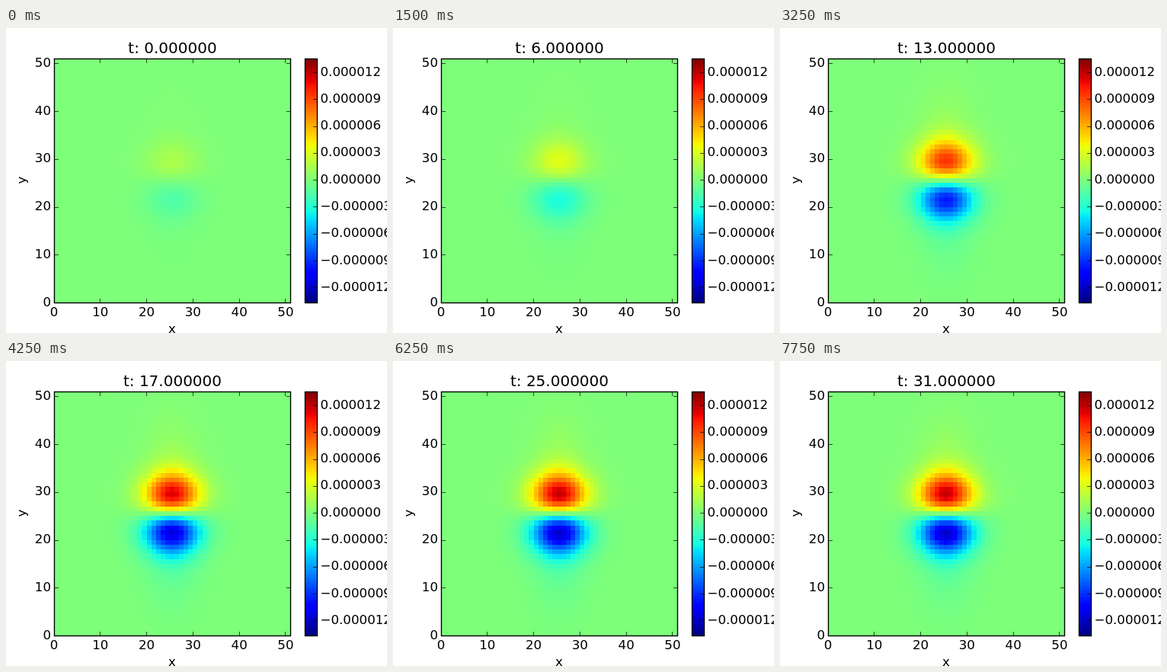
An HTML page with a canvas that plays this animation: 500 px wide and 400 px high, repeating every 8 s.

```html
<!DOCTYPE html>
<html lang="en">
<head>
<meta charset="utf-8">
<title>Field over time</title>
<style>
html, body { margin: 0; width: 100%; height: 100%; overflow: hidden; background: #fff; }
canvas { display: block; }
</style>
</head>
<body>
<canvas id="stage" width="500" height="400"></canvas>
<script>
const ctx = document.getElementById("stage").getContext("2d");
const CELLS = 51, LEFT = 63, TOP = 40, WIDTH = 310, HEIGHT = 320, BOTTOM = TOP + HEIGHT;
const MIN = -13.68, MAX = 13.55; // in units of 1e-6
const STEP_MS = 250, STEPS = 32;

const xAt = v => LEFT + v * WIDTH / CELLS;
const yAt = v => BOTTOM - v * HEIGHT / CELLS;
const barY = v => BOTTOM - (v - MIN) / (MAX - MIN) * HEIGHT;
const clamp = v => Math.min(1, Math.max(0, v));
const ramp = (v, from, to) => clamp((v - from) / (to - from));

// Jet colour map in 256 levels
function jet(level) {
  const v = Math.min(255, Math.floor(clamp(level) * 256)) / 255;
  const r = ramp(v, .35, .66) - .5 * ramp(v, .89, 1);
  const g = ramp(v, .125, .375) - ramp(v, .64, .91);
  const b = .5 + .5 * ramp(v, 0, .11) - ramp(v, .34, .65);
  return `rgb(${[r, g, b].map(c => Math.round(c * 255))})`;
}

const amplitude = t => 1.2 + 10 / (1 + Math.exp((9.7 - t) / 2.5));

// Two opposite lobes with a faint wide halo
function shape(dx, dy) {
  const lobe = dy / 4 * Math.exp(.5 - dy * dy / 32);
  const halo = .1 * dy / 9 * Math.exp(.5 - dy * dy / 162);
  const across = .95 * Math.exp(-dx * dx / 33) + .05 * Math.exp(-dx * dx / 90);
  return (lobe + halo) * across;
}

function text(str, x, y, align = "center", size = 16.67) {
  ctx.font = `${size}px "DejaVu Sans", sans-serif`;
  ctx.textAlign = align;
  ctx.fillText(str, x, Math.floor(y));
}

function tick(x, y, dx, dy) {
  ctx.beginPath();
  ctx.moveTo(x, y);
  ctx.lineTo(x + dx, y + dy);
  ctx.stroke();
}

function drawField(t) {
  const a = amplitude(t);
  for (let j = 0; j < CELLS; j++) {
    const y0 = Math.round(yAt(j + 1)), y1 = Math.round(yAt(j));
    for (let i = 0; i < CELLS; i++) {
      const x0 = Math.round(xAt(i)), x1 = Math.round(xAt(i + 1));
      ctx.fillStyle = jet((a * shape(i - 25, j - 25) - MIN) / (MAX - MIN));
      ctx.fillRect(x0, y0, x1 - x0, y1 - y0);
    }
  }
}

function drawBar() {
  for (let y = 0; y < HEIGHT; y++) {
    ctx.fillStyle = jet(1 - (y + .5) / HEIGHT);
    ctx.fillRect(392, TOP + y, 16, 1);
  }
}

function drawAxes() {
  ctx.fillStyle = ctx.strokeStyle = "#000";
  ctx.lineWidth = 1.39;
  ctx.strokeRect(63.5, 40.5, 310, 320);
  ctx.strokeRect(392.5, 40.5, 16, 320);

  ctx.lineWidth = .7;
  for (let v = 0; v <= 50; v += 10) {
    const x = Math.floor(xAt(v)) + .5, y = Math.round(yAt(v)) + .5;
    tick(x, 360.5, 0, -5.5);
    tick(x, 40.5, 0, 5.5);
    tick(63.5, y, 5.5, 0);
    tick(373.5, y, -5.5, 0);
    text(v, xAt(v), 378);
    text(v, 59, yAt(v) + 5, "right");
  }
  for (let v = -12; v <= 12; v += 3) {
    const y = barY(v);
    tick(408.5, Math.round(y) + .5, -5.5, 0);
    text((v < 0 ? "\u2212" : "") + (Math.abs(v) / 1e6).toFixed(6), 412.5, y + 5, "left");
  }
  text("x", 218, 400);
  ctx.save();
  ctx.translate(26, 199.5);
  ctx.rotate(-Math.PI / 2);
  text("y", 0, 0);
  ctx.restore();
}

function frame() {
  const t = Math.floor(performance.now() / STEP_MS) % STEPS;
  ctx.fillStyle = "#fff";
  ctx.fillRect(0, 0, 500, 400);
  drawField(t);
  drawBar();
  drawAxes();
  text("t: " + t.toFixed(6), 218.5, 33, "center", 20);
  requestAnimationFrame(frame);
}
frame();
</script>
</body>
</html>
```
